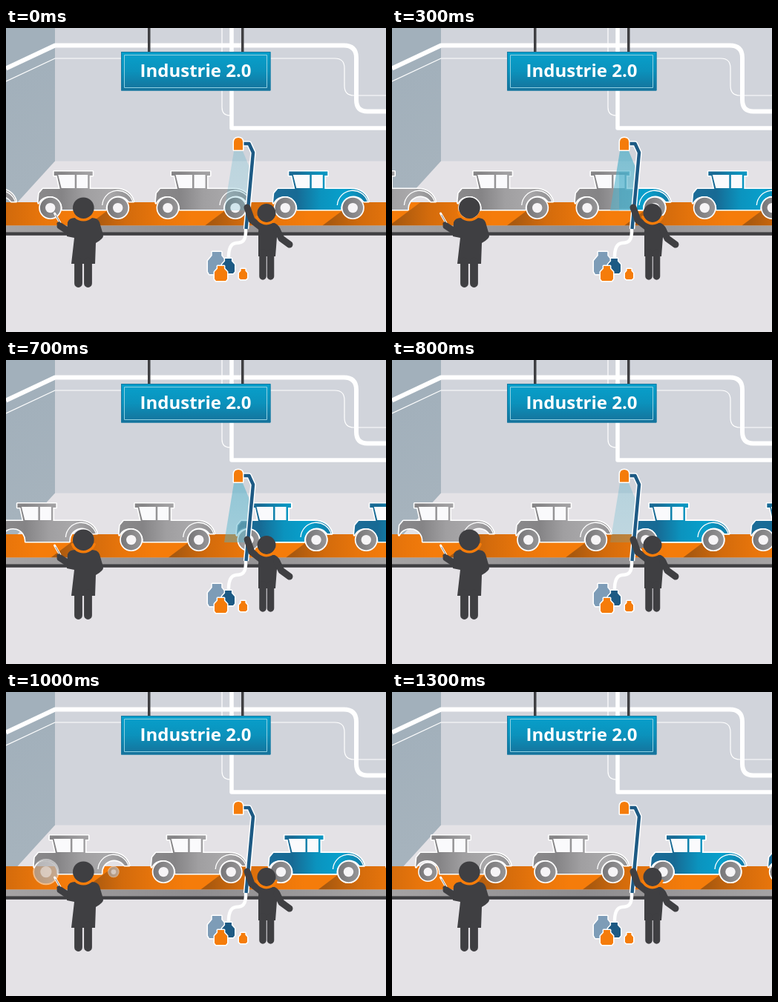
An HTML page with a canvas that plays this animation: 512x410 px, repeating every 1.4 s.

```html
<!DOCTYPE html>
<html lang="de">
<head>
<meta charset="utf-8">
<title>Industrie 2.0</title>
<style>
html, body { margin: 0; width: 100%; height: 100%; overflow: hidden; background: #e4e2e6; }
canvas { display: block; width: 512px; height: 410px; }
</style>
</head>
<body>
<canvas id="stage" width="512" height="410"></canvas>
<script>
const ctx = document.getElementById('stage').getContext('2d');
const STEP = 100, GAP = 158.3, WHEEL_Y = 242.6, AXLE = 91;
const ORANGE = '#f57c0a', DARK = '#3f3f42', NAVY = '#1d5a84';
// Rear axle of the car being painted, one value per step.
const axleX = [218, 230, 244, 263, 280, 296, 312, 327, 342, 357, 370.5, 372, 368, 365];
const beamAlpha = [.4, .75, .95, 1, 1, 1, 1, .8, .45, .15, 0, 0, 0, 0];

const bodyPath = new Path2D('M-16 233L-15 223L-10 217H13L9 199H5V193.5H57V199H53V217H88' +
  'C101 217 110 224 112 234H106A17 17 0 0 0 75 245H16A17 17 0 0 0 -16 236Z');
const windowPath = new Path2D('M10.5 198H33V216H15ZM35.5 198H50.5V216H35.5Z');

function linear(x0, y0, x1, y1, ...colors) {
  const g = ctx.createLinearGradient(x0, y0, x1, y1);
  colors.forEach((c, i) => g.addColorStop(i / (colors.length - 1), c));
  return g;
}

function fill(d, color) {
  ctx.fillStyle = color;
  ctx.fill(d instanceof Path2D ? d : new Path2D(d));
}

function line(d, color, width, cap = 'butt') {
  ctx.strokeStyle = color;
  ctx.lineWidth = width;
  ctx.lineCap = cap;
  ctx.lineJoin = 'round';
  ctx.stroke(d instanceof Path2D ? d : new Path2D(d));
}

function disc(x, y, r, color) {
  ctx.beginPath();
  ctx.arc(x, y, r, 0, 2 * Math.PI);
  ctx.fillStyle = color;
  ctx.fill();
}

function room() {
  ctx.fillStyle = '#e4e2e6';
  ctx.fillRect(0, 0, 512, 410);
  ctx.fillStyle = '#d1d4db';
  ctx.fillRect(66, 0, 446, 179.5);
  fill('M0 0H66V179.5L0 252Z', linear(0, 60, 66, 200, '#a2b0bb', '#a6b3bd'));
  line('M0 54.5L66 23.5H455Q472 23.5 472 40V97Q472 112.5 487 112.5H512', '#fff', 6);
  line('M0 72L66 41H443Q456 41 456 54V78Q456 91 469 91H512', '#fff', 1.2);
  line('M304 0V135H512', '#fff', 5.5);
  line('M291 0V107Q291 118 302 118', '#fff', 1.2);
}

function sign() {
  ctx.fillStyle = DARK;
  ctx.fillRect(191, 0, 3.5, 32);
  ctx.fillRect(317, 0, 3.5, 32);
  ctx.fillStyle = linear(0, 32, 0, 84, '#07a0cc', '#0b92bc', '#15719a');
  ctx.fillRect(155, 32, 201.5, 52.5);
  ctx.lineWidth = 1;
  ctx.strokeStyle = '#177aa2';
  ctx.strokeRect(155.5, 32.5, 200.5, 51.5);
  ctx.strokeStyle = '#8fd0e2';
  ctx.strokeRect(159.5, 36.5, 192, 44);
  ctx.fillStyle = '#fff';
  ctx.font = 'bold 24px "Open Sans", sans-serif';
  ctx.textAlign = 'center';
  ctx.fillText('Industrie 2.0', 255.5, 66);
}

function belt(x) {
  ctx.fillStyle = ORANGE;
  ctx.fillRect(0, 235, 512, 31.5);
  for (let k = -3; k <= 1; k++) {
    const s = x + k * GAP;
    fill(`M${s + 50} 266.5L${s + 92} 235H${s + 92 + GAP}L${s + 50 + GAP} 266.5Z`,
      linear(s + 60, 0, s + 190, 0, '#a9590f', '#d36b0c', '#e8750b', ORANGE));
  }
  ctx.fillStyle = linear(0, 0, 512, 0, '#a5a3a4', '#8f8d8f', '#a5a3a4');
  ctx.fillRect(0, 266.5, 512, 9);
  ctx.fillStyle = DARK;
  ctx.fillRect(0, 275.3, 512, 4.5);
}

function wheel(x, { scale, alpha }) {
  if (alpha <= 0) return;
  ctx.save();
  ctx.globalAlpha *= alpha;
  ctx.translate(x, WHEEL_Y);
  ctx.scale(scale, scale);
  disc(0, 0, 15.5, '#fff');
  disc(0, 0, 13.8, linear(-14, 0, 14, 0, '#777678', '#969597'));
  disc(0, 0, 6.7, '#f6f4f6');
  ctx.restore();
}

function chassis(x, blue) {
  const paint = blue ? linear(-17, 0, 112, 0, '#1c6c98', '#176a94', '#0b93be', '#07a0cc', '#1379a4')
                     : linear(-17, 0, 112, 0, '#8a898b', '#858486', '#a09fa1', '#a9a8aa', '#8f8e90');
  ctx.save();
  ctx.translate(x, 0);
  line(bodyPath, '#fff', 3.2);
  fill(bodyPath, paint);
  fill(windowPath, '#fafafc');
  line('M70 239A21 21 0 0 1 111 234', '#fff', 1.3);
  ctx.restore();
}

const FIXED = { scale: 1, alpha: 1 };

function car(x, blue, rear = FIXED, front = FIXED) {
  chassis(x, blue);
  wheel(x, rear);
  wheel(x + AXLE, front);
}

function cars(x, i) {
  // The rear wheel fades in oversized and springs back; the front one grows.
  const alpha = Math.min(1, Math.max(0, (i - 8) / 4));
  const rear = { scale: 1 + .14 * Math.cos((i - 10) * Math.PI / 3), alpha };
  const front = { scale: Math.min(1, Math.max(0, (i - 9) / 2)), alpha };
  car(x - 2 * GAP, false, rear, front);
  car(x - GAP, false);
  car(x, false);
  if (i > 0) {
    for (const [edge, opacity] of [[306, .4], [325, 1]]) {
      ctx.save();
      ctx.beginPath();
      ctx.rect(edge, 180, 512, 100);
      ctx.clip();
      ctx.globalAlpha = opacity;
      car(x, true);
      ctx.restore();
    }
  }
  car(x + GAP, true);
}

function can(x, y, w, h, color) {
  const c = w * .24;
  const p = new Path2D(`M${x + c} ${y}H${x + w - c}V${y + h * .17}L${x + w} ${y + h * .4}` +
    `V${y + h * .88}L${x + w - 2} ${y + h}H${x + 2}L${x} ${y + h * .88}V${y + h * .4}L${x + c} ${y + h * .17}Z`);
  line(p, '#fff', 3);
  fill(p, color);
}

function sprayer(alpha) {
  ctx.globalAlpha = alpha;
  fill('M307 166H319L329 190L325 246H294Z',
    linear(0, 166, 0, 246, 'rgba(70,172,198,.65)', 'rgba(80,180,205,.55)'));
  ctx.globalAlpha = 1;
  line('M323 270C324 288 318 290 310 290Q299 291 300 313', '#fff', 4.5);
  const pole = 'M319 156H327.5L333 168L323.5 271';
  line(pole, '#fff', 7.5);
  line(pole, NAVY, 4.5);
  const lamp = new Path2D('M307 164.5V154Q307 148 313 148Q319 148 319 154V164.5Z');
  line(lamp, '#fff', 3);
  fill(lamp, ORANGE);
  can(272, 302, 24, 30, '#7d9cb7');
  can(291, 311, 17, 20, NAVY);
  can(281, 321, 17, 20, ORANGE);
  can(314, 325, 11, 14, ORANGE);
}

function head(x, y, r) {
  disc(x, y, r, DARK);
  ctx.beginPath();
  ctx.arc(x, y, r + 1.7, .12 * Math.PI, .88 * Math.PI);
  ctx.strokeStyle = ORANGE;
  ctx.lineWidth = 3.4;
  ctx.stroke();
}

function people() {
  // Inspector with screwdriver
  line('M65.5 250L73 263', '#fff', 3, 'round');
  line('M67 252.5L73 263', '#777', 1, 'round');
  line('M73 267L88 277', DARK, 9, 'round');
  line('M71 264L74 268', DARK, 5, 'round');
  fill('M93 256H115Q124 256 126 262L131 279Q132 284 121 290L120 318H88L92 283L82 281L83 262Q85 256 93 256Z', DARK);
  line('M97.5 315V344.5M110.5 315V344.5', DARK, 10.8, 'round');
  head(104.3, 242.7, 14.3);

  // Painter
  line('M325 242L331 259L345 270', DARK, 9, 'round');
  fill('M341 263H362Q369 266 371 276L365 282L363 308H340V275Z', DARK);
  line('M365 272L371 284L382 292', DARK, 9, 'round');
  line('M346 303V335M356.5 303V335', DARK, 9.5, 'round');
  head(351, 249.5, 12.5);
}

function draw(now) {
  const i = Math.floor(now / STEP) % axleX.length;
  const x = axleX[i];
  room();
  sign();
  belt(x);
  cars(x, i);
  sprayer(beamAlpha[i]);
  people();
  requestAnimationFrame(loop);
}

const start = performance.now();
function loop() { draw(performance.now() - start); }
loop();
</script>
</body>
</html>
```
